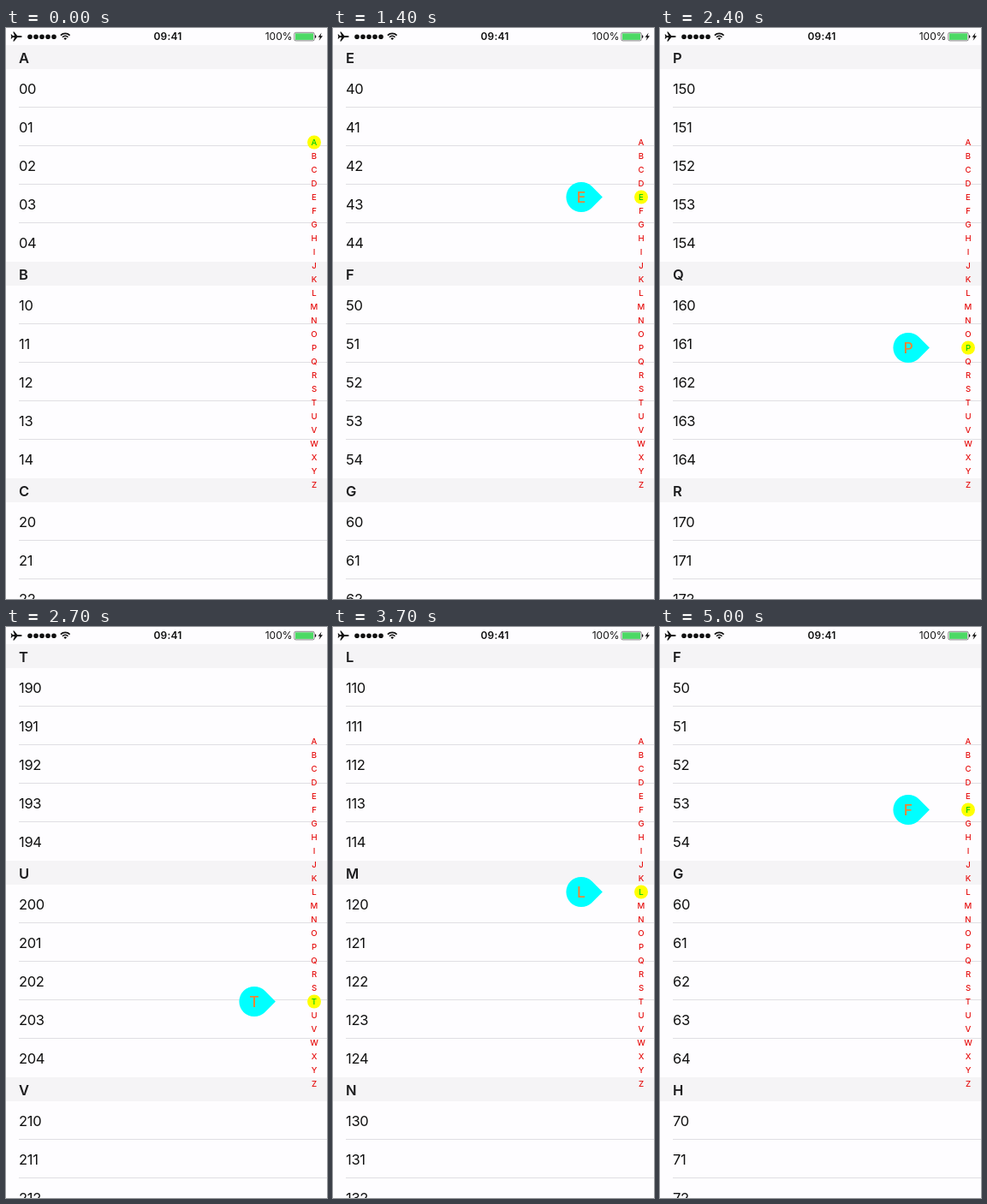
Animation, 375 px wide and 667 px high, one loop 5.1 s. Source, as an HTML page with a canvas:

```html
<!DOCTYPE html>
<html lang="en">
<head>
<meta charset="utf-8">
<title>Indexed list</title>
<style>
html, body { margin: 0; width: 100%; height: 100%; overflow: hidden; background: #fefdff; }
canvas { display: block; width: 375px; height: 667px; }
</style>
</head>
<body>
<canvas id="stage"></canvas>
<script>
const W = 375, H = 667, LOOP = 5100, STEP = 100, TOUCH = 1400;
const LETTERS = 'ABCDEFGHIJKLMNOPQRSTUVWXYZ';
const FONT = 'Inter, Roboto, sans-serif';
const PAPER = '#fefdff', INK = '#111';
const HEADER = 28, ROW = 45, ROWS = 5, TOP = 20;

// Section under the finger, one entry per step from TOUCH on.
const TRAIL = [
  4, 5, 6, 7, 8, 9, 10, 11, 12, 14, 15, 16, 18, 19, 20, 21, 22, 21, 20,
  18, 16, 14, 13, 11, 9, 7, 6, 5, 4, 3, 2, 1, 2, 3, 3, 4, 5
];

const canvas = document.getElementById('stage');
const ctx = canvas.getContext('2d');
const dpr = window.devicePixelRatio || 1;
canvas.width = W * dpr;
canvas.height = H * dpr;
ctx.scale(dpr, dpr);

function text(str, x, y, size, weight, color, align = 'left', spacing = 0) {
  ctx.font = `${weight} ${size}px ${FONT}`;
  ctx.letterSpacing = spacing + 'px';
  ctx.textAlign = align;
  ctx.textBaseline = 'alphabetic';
  ctx.fillStyle = color;
  ctx.fillText(str, x, y);
}

function rect(x, y, w, h, color) {
  ctx.fillStyle = color;
  ctx.fillRect(x, y, w, h);
}

function disc(x, y, r, color) {
  ctx.fillStyle = color;
  ctx.beginPath();
  ctx.arc(x, y, r, 0, Math.PI * 2);
  ctx.fill();
}

function shape(path, color) {
  ctx.fillStyle = color;
  ctx.fill(new Path2D(path));
}

function drawList(first) {
  let y = TOP;
  for (let s = first; y < H && s < LETTERS.length; s++) {
    rect(0, y, W, HEADER, '#f5f4f6');
    text(LETTERS[s], 15, y + 20.5, 16.5, 600, '#1c1c1e');
    y += HEADER;
    for (let r = 0; r < ROWS; r++, y += ROW) {
      text(`${s}${r}`, 15, y + 28.5, 16.5, 400, INK, 'left', -0.3);
      if (r < ROWS - 1) rect(15, y + ROW - 1, W - 15, 1, '#e0dfe3');
    }
  }
}

function drawWifi(x, y) {
  ctx.strokeStyle = INK;
  ctx.lineWidth = 1.6;
  for (const r of [4.6, 7.6]) {
    ctx.beginPath();
    ctx.arc(x, y, r, -Math.PI * 0.75, -Math.PI * 0.25);
    ctx.stroke();
  }
  ctx.fillStyle = INK;
  ctx.beginPath();
  ctx.moveTo(x, y);
  ctx.arc(x, y, 2.6, -Math.PI * 0.75, -Math.PI * 0.25);
  ctx.fill();
}

function drawStatus() {
  rect(0, 0, W, TOP, PAPER);
  shape('M19 10Q18.4 9 16.5 9H13.2L9.6 4.5H8.2L10 9H7.9L6.6 7.4H5.6L6.3 10L5.6 12.6H6.6L7.9 11H10L8.2 15.5H9.6L13.2 11H16.5Q18.4 11 19 10Z', INK);
  for (let i = 0; i < 5; i++) disc(28 + i * 7, 10.3, 2.8, INK);
  drawWifi(69.2, 14);
  text('09:41', 189, 14.4, 12, 600, INK, 'center', 0.2);
  text('100%', 334.5, 14.4, 12, 400, INK, 'right');
  ctx.strokeStyle = '#333';
  ctx.lineWidth = 0.6;
  ctx.beginPath();
  ctx.roundRect(336.8, 5.3, 23.4, 9.6, 1.8);
  ctx.stroke();
  rect(338, 6.3, 21, 7.6, '#4cd964');
  shape('M361 8.3Q362.4 8.6 362.4 10.1Q362.4 11.6 361 11.9Z', INK);
  shape('M368.6 5.4L364.6 10.7H366.9L365.7 14.8L370 9.3H367.5Z', INK);
}

function drawIndex(active) {
  for (let i = 0; i < LETTERS.length; i++) {
    const y = 133.5 + i * 16, on = i === active;
    if (on) disc(360, y, 8, '#ff0');
    text(LETTERS[i], 360, y + 3.5, 9.6, 500, on ? '#0c1' : '#e60f0f', 'center');
  }
}

function drawBubble(active) {
  const x = 290, y = 133.5 + active * 16, r = 17.6;
  ctx.fillStyle = '#0ff';
  ctx.beginPath();
  ctx.arc(x, y, r, Math.PI / 4, -Math.PI / 4);
  ctx.lineTo(x + r * Math.SQRT2, y);
  ctx.fill();
  text(LETTERS[active], x, y + 6.3, 17.5, 500, '#f5822e', 'center');
}

function draw(t) {
  const touching = t >= TOUCH;
  const active = touching ? TRAIL[Math.floor((t - TOUCH) / STEP)] : 0;
  rect(0, 0, W, H, PAPER);
  drawList(active);
  drawStatus();
  drawIndex(active);
  if (touching) drawBubble(active);
}

const start = performance.now();
function tick() {
  draw((performance.now() - start) % LOOP);
  requestAnimationFrame(tick);
}
tick();
</script>
</body>
</html>
```
